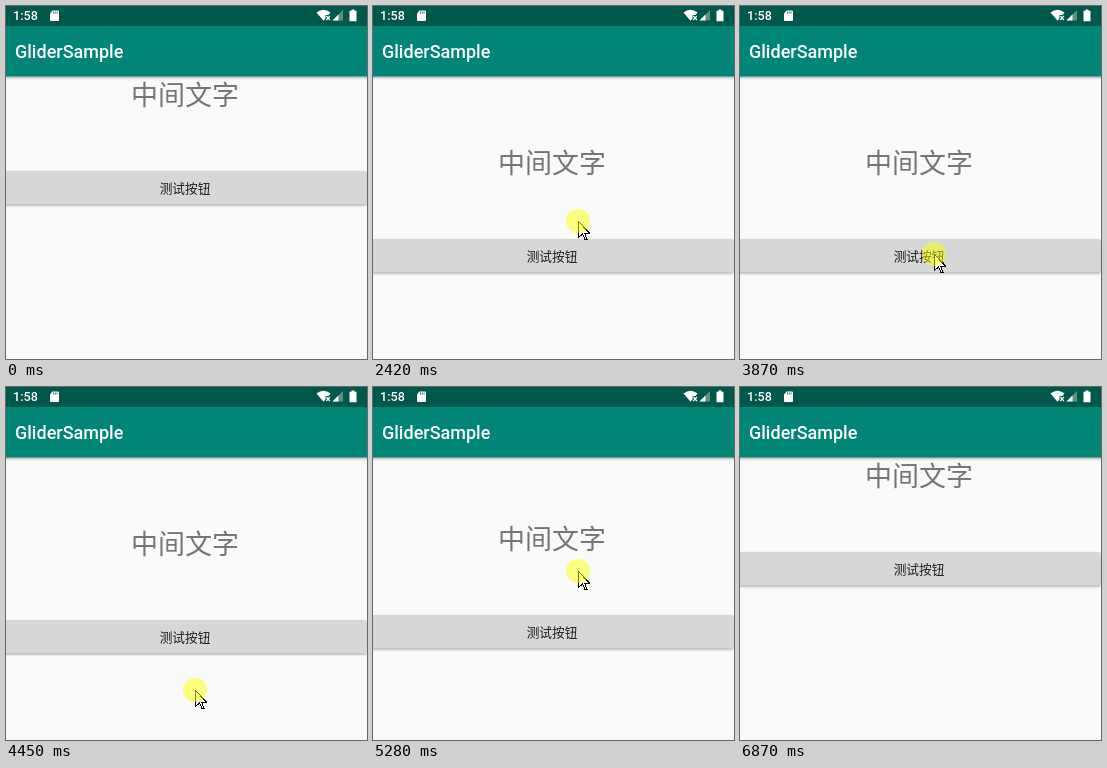
These frames come from a looping animation (361x353 px, 7270 ms). An HTML page:

```html
<!DOCTYPE html>
<html lang="zh">
<head>
<meta charset="utf-8">
<style>
  html, body { margin: 0; width: 100%; height: 100%; overflow: hidden; background: #fafafa; }
  svg { display: block; }
  text { font-family: Roboto, "Noto Sans CJK SC", "Noto Sans CJK", sans-serif; }
  .light { fill: #fff; font-weight: 500; }
  .mid { text-anchor: middle; }
  #button { filter: drop-shadow(0 1px 1px rgba(0, 0, 0, .35)); }
  #bar { filter: drop-shadow(0 1.5px 1.5px rgba(0, 0, 0, .4)); }
</style>
</head>
<body>
<svg width="361" height="353" viewBox="0 0 361 353">
  <rect width="361" height="353" fill="#fafafa"/>
  <g id="content">
    <text class="mid" x="179" y="99" font-size="27" fill="#757575">中间文字</text>
    <rect id="button" x="-6" y="165" width="366.5" height="33.5" rx="2" fill="#d6d7d7"/>
    <text class="mid" x="179" y="186.5" font-size="12.7" fill="#1c1c1c">测试按钮</text>
  </g>
  <rect id="bar" x="-6" width="373" height="70.4" fill="#008577"/>
  <rect width="361" height="20" fill="#00574b"/>
  <text class="light" x="9" y="52" font-size="18">GliderSample</text>
  <text class="light" x="7" y="14.3" font-size="12.6">1:58</text>
  <g fill="#fff">
    <path d="M46.500 4.500h5.500q1 0 1 1v8.500q0 1-1 1h-7q-1 0-1-1V7.500z"/>
    <path d="M47.500 5.500v2M49.300 5.500v2M51.100 5.500v2" stroke="#00574b" stroke-width=".8"/>
    <path d="M310.500 6.500q7-5.500 14 0l-2 2.500h-3v3.500l-2 2.200z"/>
    <path d="M320.300 10l3.600 4m0-4l-3.600 4" stroke="#fff" stroke-width="1.200"/>
    <path d="M337 4v10.500h-10.500z" opacity=".35"/>
    <path d="M332.500 8.500v6h-6z"/>
    <path d="M345.500 3.500h3v1.200h2v10.500h-7V4.700h2z"/>
  </g>
  <g id="pointer">
    <path d="M.5 .5V16.500L4.500 13 7 18.500H9L6.700 12.200H11.500z" fill="#fff" stroke="#000" shape-rendering="crispEdges"/>
    <circle id="press" r="12" fill="#ff0" opacity=".5"/>
  </g>
</svg>
<script>
const LOOP = 7270, MAX_PULL = 68, BOUNCE = 250, BOUNCE_DELAY = 40;
const $ = id => document.getElementById(id);
const home = { x: 206, y: 121 };

// Pointer strokes; a stroke with a release time is a drag that pulls the content.
const strokes = [
  { start: 650, end: 920, x: 195, y: 143 },
  { start: 1250, end: 1670, x: 204, y: 119 },
  { start: 2000, end: 2685, x: 206, y: 262, release: 2970 },
  { start: 2970, end: 3260, ...home },
  { start: 3300, end: 4200, x: 189, y: 303, release: 4520 },
  { start: 4520, end: 4810, ...home },
  { start: 5000, end: 5700, x: 203, y: 299, release: 5900 },
  { start: 5850, end: 5970, x: 201, y: 288 },
  { start: 5970, end: 6590, x: 325, y: 306 },
  { start: 6590, end: 6870, x: 351, y: 352 }
];
let from = { x: 279, y: 332 };
for (const stroke of strokes) {
  stroke.from = from;
  from = stroke;
}

const clamp = (v, max) => Math.min(max, Math.max(0, v));
const smooth = k => k * k * (3 - 2 * k);

function viscous(p) {
  const x = 8 * clamp(p, 1), e = Math.exp(-1);
  return x < 1 ? x - 1 + Math.exp(-x) : 1 - (1 - e) * Math.exp(1 - x);
}

function pullAt(t, y) {
  const drag = strokes.filter(s => s.release && s.start <= t).pop();
  if (!drag) return 0;
  if (t < drag.release) return clamp(y - drag.from.y, MAX_PULL);
  return MAX_PULL * (1 - viscous((t - drag.release - BOUNCE_DELAY) / BOUNCE));
}

function draw(t) {
  const stroke = strokes.filter(s => s.start <= t).pop();
  const visible = stroke && t < 6870;
  let x = 0, y = 0;
  if (visible) {
    const k = smooth(clamp((t - stroke.start) / (stroke.end - stroke.start), 1));
    x = Math.round(stroke.from.x + (stroke.x - stroke.from.x) * k);
    y = Math.round(stroke.from.y + (stroke.y - stroke.from.y) * k);
  }
  const pressed = strokes.some(s => t >= s.start && t < s.release);
  $("pointer").style.display = visible ? "" : "none";
  $("pointer").setAttribute("transform", `translate(${x} ${y})`);
  $("press").style.display = pressed ? "" : "none";
  $("content").setAttribute("transform", `translate(0 ${Math.floor(pullAt(t, y))})`);
}

const begin = performance.now();
(function frame() {
  draw((performance.now() - begin) % LOOP);
  requestAnimationFrame(frame);
})();
</script>
</body>
</html>
```
